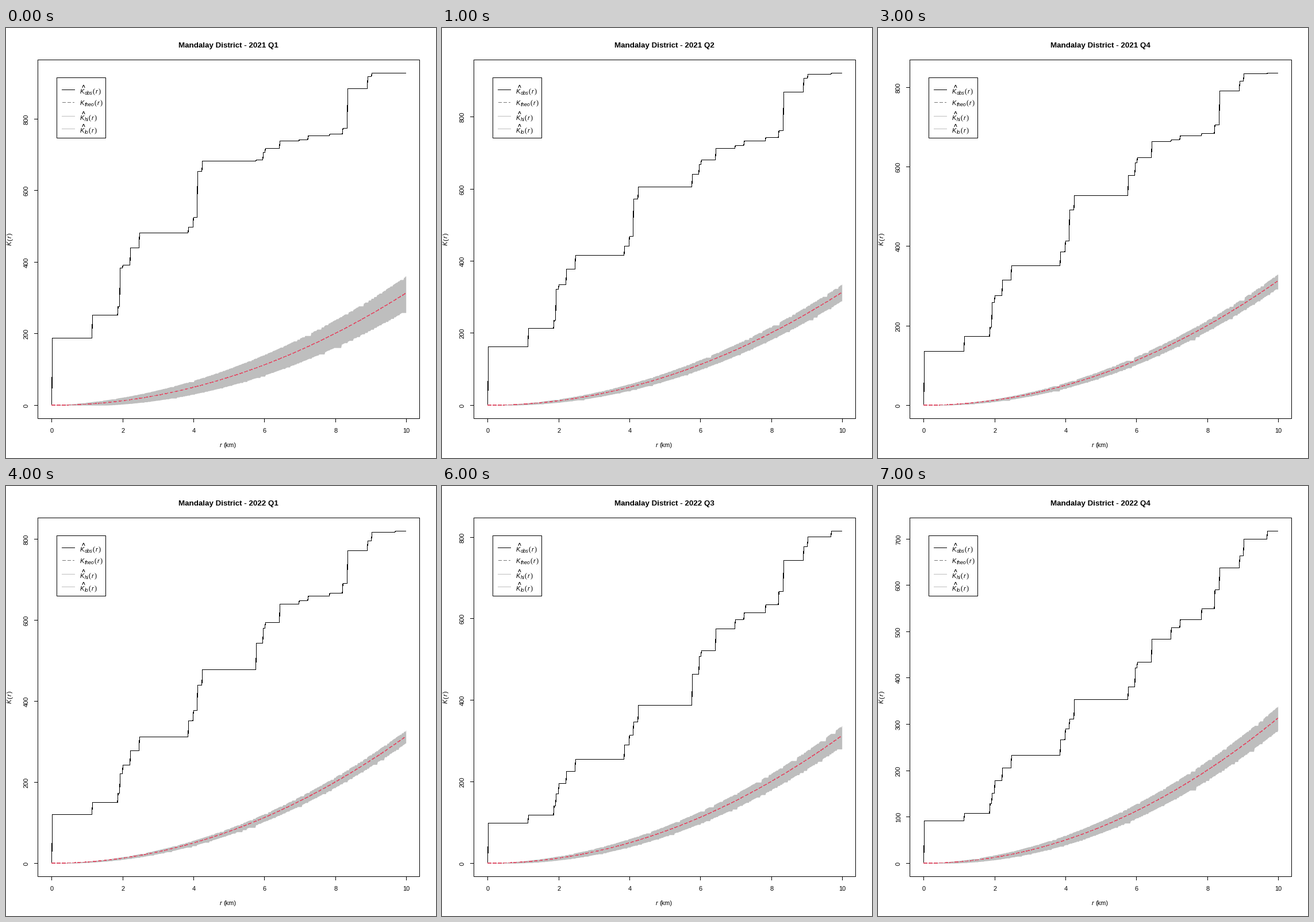
Recreate the animation shown at these times as a matplotlib script. Size 748x748 px, loop 8000 ms.

```python
import numpy as np
import matplotlib.pyplot as plt
from matplotlib.animation import FuncAnimation

SIZE, DPI = 748, 64
PT = 72 / DPI                      # points per pixel
LEFT, RIGHT, TOP, BOTTOM = 55.5, 719.5, 55.5, 679.5
X0, X_UNIT = 79.6, 61.7
Y0, Y_SPAN = 656.2, 577.8
GREY, RED = "#BEBEBE", "#DF536B"
DASH = (0, (5 * PT, 3 * PT))
QUARTERS = 8

plt.rcParams["lines.scale_dashes"] = False

r = np.linspace(0, 9.985, 513)
theo = np.pi * r ** 2

# Distances where the observed curve jumps, and its levels there
# in the first and in the last quarter
JUMPS = np.array([.015, 1.14, 1.87, 1.92, 2.0, 2.21, 2.47, 3.85, 3.98, 4.1, 4.24,
                  5.76, 5.96, 6.02, 6.43, 6.98, 7.22, 7.83, 8.2, 8.33, 8.9, 9.01, 9.69])
FIRST = np.array([188, 252, 276, 384, 392, 439, 482, 497, 525, 653, 682,
                  686, 706, 717, 739, 742, 752, 757, 773, 884, 918, 928, 928])
LAST = np.array([91, 107, 129, 151, 178, 206, 233, 267, 290, 311, 353,
                 380, 422, 434, 483, 508, 526, 549, 590, 638, 664, 699, 717])

# Key quarters: how far the curve has gone from FIRST to LAST at the
# distances MIX_R, and how fast the envelope widens with distance
KEY_TIMES = [0, 1, 2, 4, 6, 7]
MIX_R = [2, 4.5, 6.5, 9.6]
MIX = np.array([[0, .27, .38, .70, .92, 1],
                [0, .23, .31, .61, .89, 1],
                [0, .10, .20, .38, .63, 1],
                [0, .03, .36, .51, .535, 1]])
SPREAD = [4.8, 2.3, 1.9, 1.6, 2.5, 2.6]


def observed(q):
    mix = np.interp(JUMPS, MIX_R, [np.interp(q, KEY_TIMES, m) for m in MIX])
    levels = np.append(0, FIRST + mix * (LAST - FIRST))
    return levels[np.searchsorted(JUMPS, r, side="right")]


def envelope(q):
    """Ragged band around the theoretical curve, held between random knots."""
    rng = np.random.default_rng(q)
    gap = np.interp(q, KEY_TIMES, SPREAD) * r
    edges = []
    for edge in (theo - gap, theo + gap):
        keep = rng.random(r.size) < .5
        keep[0] = True
        held = np.maximum.accumulate(np.where(keep, np.arange(r.size), 0))
        edges.append(np.maximum(edge[held], 0))
    return edges


fig = plt.figure(figsize=(SIZE / DPI, SIZE / DPI), dpi=DPI, facecolor="white")
ax = fig.add_axes([0, 0, 1, 1])


def centre(v):
    """Middle of the pixel that holds v."""
    return np.floor(v) + .5


def line(x, y, color="black"):
    ax.plot(x, y, color=color, lw=PT, snap=False,
            solid_joinstyle="miter", solid_capstyle="projecting")


def hairline(x, y, color="black", style="-"):
    # Without antialiasing every touched pixel is filled, so stay thin
    ax.plot(x, y, color=color, ls=style, lw=.2 * PT, antialiased=False,
            snap=False, dash_capstyle="butt")


def box(left, top, right, bottom):
    line([left, right, right, left, left], [top, top, bottom, bottom, top])


def text(x, y, s, size=11, ha="left", family="Liberation Sans", **kw):
    ax.text(x, y, s, fontsize=size * PT, ha=ha, va="baseline",
            family=family, rotation_mode="anchor", **kw)


def legend_row(line_y, base, sub, arg_x, color, style="-", hat=True):
    hairline([98, 119], [line_y, line_y], color, style)
    text(129, base, "K", style="italic")
    text(136.5, base + 2, sub, 8.6, style="italic")
    text(arg_x, base, "(", 12.5, family="Liberation Serif")
    text(arg_x + 5, base, "r", style="italic")
    text(arg_x + 10, base, ")", 12.5, family="Liberation Serif")
    if hat:
        text(134.5, base - 7, "^", 10, ha="center", weight="bold")


def legend():
    box(88.5, 86.5, 173.5, 191.5)
    legend_row(107.5, 114, "obs", 151, "black")
    legend_row(129.5, 134, "theo", 153.5, "#787878", DASH, hat=False)
    legend_row(153.5, 160, "hi", 144, GREY)
    legend_row(175.5, 182, "lo", 144, GREY)


def axes_frame(to_y, peak):
    box(LEFT, TOP, RIGHT, BOTTOM)
    for v in range(0, 11, 2):
        x = centre(X0 + X_UNIT * v)
        line([x, x], [BOTTOM, BOTTOM + 6])
        text(x, 704, str(v), ha="center")
    for v in range(0, int(peak) + 1, 200 if peak > 800 else 100):
        y = centre(to_y(v))
        line([LEFT - 6, LEFT], [y, y])
        text(39, y, str(v), ha="center", rotation=90)
    text(372, 729, "r", style="italic")
    text(378.5, 729, "(km)")
    for y, s, slant in [(378, "K", "italic"), (369.5, "(", "normal"),
                        (364.5, "r", "italic"), (359.5, ")", "normal")]:
        text(10, y, s, style=slant, rotation=90)


def draw(q):
    obs = observed(q)
    low, high = envelope(q)
    peak = obs.max()

    def to_y(k):
        return Y0 - Y_SPAN * k / peak

    ax.clear()
    ax.set(xlim=(0, SIZE), ylim=(SIZE, 0))
    ax.axis("off")
    x = X0 + X_UNIT * r
    ax.fill_between(x, to_y(low), to_y(high), color=GREY, lw=0, antialiased=False)
    hairline(x, centre(to_y(obs)))
    hairline(x, to_y(theo), RED, DASH)
    axes_frame(to_y, peak)
    legend()
    title = f"Mandalay District - {2021 + q // 4} Q{q % 4 + 1}"
    text(387, 33.7, title, 13.4, ha="center", weight="bold")
    return []


anim = FuncAnimation(fig, draw, frames=QUARTERS, init_func=lambda: [],
                     interval=1000, repeat=True, repeat_delay=0)
plt.show()
```
